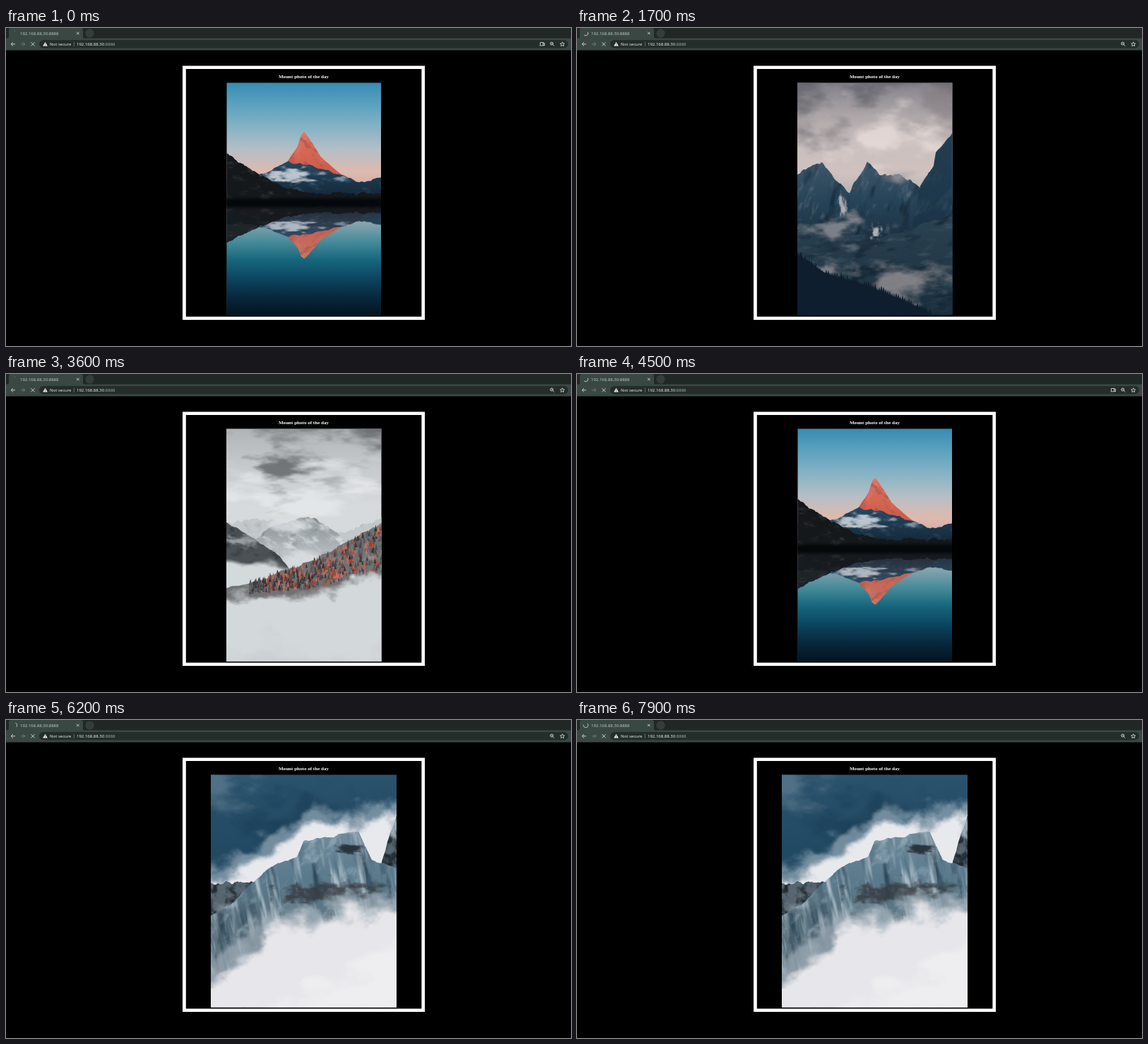
These frames come from a looping animation (800 by 450 pixels, 8000 ms). An HTML page with a canvas:

```html
<!DOCTYPE html>
<html lang="en">
<head>
<meta charset="utf-8">
<title>Mount photo of the day</title>
<style>
html, body { margin: 0; width: 100%; height: 100%; overflow: hidden; background: #000; }
svg, canvas { position: absolute; left: 0; top: 0; }
text { font: 6px "Noto Sans", "Open Sans", sans-serif; fill: #e6ebe9; }
.line { fill: none; stroke: #d3dad7; stroke-width: .9; }
</style>
</head>
<body>
<svg width="800" height="450" viewBox="0 0 800 450">
  <rect width="800" height="16" fill="#202724"/>
  <path d="M2 15Q4 15 4 12V3Q4 0 7 0H106Q109 0 109 3V12Q109 15 111 15Z" fill="#3a4843"/>
  <rect y="14.5" width="800" height="17" fill="#3a4843"/>
  <rect x="47" y="17" width="749" height="11.5" rx="5.7" fill="#242d2a"/>
  <circle cx="118.5" cy="7.5" r="6.2" fill="#343d3a"/>
  <path id="spin" class="line"/>
  <text x="20" y="9.7" style="fill:#b9c3bf">192.168.88.30:8888</text>
  <path class="line" d="M100 5.7l3.5 3.5m0-3.5l-3.5 3.5"/>
  <path class="line" d="M13 22.8H7.2M10 20l-2.8 2.8l2.8 2.8"/>
  <path class="line" style="stroke:#74807b" d="M21 22.8h5.8M24 20l2.8 2.8l-2.8 2.8"/>
  <path class="line" d="M35.4 20.2l5.2 5.2m0-5.2l-5.2 5.2"/>
  <path d="M55.5 19.8L58.8 25.5H52.2Z" fill="#f2f5f4"/>
  <path d="M55.5 21.7v1.8m0 .6v.7" stroke="#242d2a" stroke-width=".7"/>
  <text x="62" y="25">Not secure</text>
  <path d="M96.3 19.5V26" stroke="#7c8783" stroke-width=".7"/>
  <text x="100" y="25">192.168.88.30<tspan fill="#9ba6a2">:8888</tspan></text>
  <g id="device" class="line"><path d="M756.5 24v-3.5h5M755.5 24.8h4.5"/><rect x="760.5" y="21.7" width="2" height="3"/></g>
  <g class="line"><circle cx="772.7" cy="22" r="2"/><path d="M774.2 23.5l2.1 2.1M771.7 22h2"/></g>
  <path id="star" class="line"/>
  <rect id="outer" x="250" y="53.5" width="343" fill="#fff"/>
  <rect id="inner" x="254.8" y="58" width="333.6" fill="#000"/>
  <text x="421.5" y="71.2" text-anchor="middle" style="font:bold 7.08px 'Liberation Serif',serif;fill:#fff">Mount photo of the day</text>
</svg>
<canvas id="stage" width="800" height="450"></canvas>
<script>
const $ = id => document.getElementById(id);
const stage = $('stage').getContext('2d');
const LEFT = 280, TOP = 77.5, BOTTOM = 406.5, W = 280, H = 340;
let g, seed = 4242;

const rnd = () => (seed = seed * 16807 % 2147483647) / 2147483647;
const lattice = Float32Array.from({ length: 65536 }, rnd);
const cell = (x, y) => lattice[(x & 255) + 256 * (y & 255)];

function noise(x, y) {
  const ix = Math.floor(x), iy = Math.floor(y);
  let u = x - ix, v = y - iy;
  u *= u * (3 - 2 * u);
  v *= v * (3 - 2 * v);
  const a = cell(ix, iy), b = cell(ix, iy + 1);
  const top = a + (cell(ix + 1, iy) - a) * u;
  return top + (b + (cell(ix + 1, iy + 1) - b) * u - top) * v;
}

// Four octaves of noise, centred on zero.
function fractal(x, y) {
  let sum = -.47;
  for (let a = .5; a > .05; a /= 2) {
    sum += a * noise(x, y);
    x = x * 2 + 17;
    y = y * 2 + 5;
  }
  return sum;
}

// Height over x through a few key points.
const line = (...p) => x => {
  let i = 0;
  while (i < p.length - 4 && x > p[i + 2]) i += 2;
  const k = Math.min(1, Math.max(0, (x - p[i]) / (p[i + 2] - p[i])));
  return p[i + 1] + (p[i + 3] - p[i + 1]) * k;
};

// Amounts for mist: under a line, above a line, around a centre, everywhere.
const below = (top, soft) => (x, y) => (y - top(x)) / soft;
const above = (top, soft) => below(top, -soft);
const near = (cx, cy, rx, ry) => (x, y) => 1 - Math.hypot((x - cx) / rx, (y - cy) / ry);
const even = amount => () => amount;

function fade(y0, y1, ...colors) {
  const grad = g.createLinearGradient(0, y0, 0, y1);
  colors.forEach((c, i) => grad.addColorStop(i / (colors.length - 1), c));
  return grad;
}

function band(y0, y1, ...colors) {
  g.fillStyle = fade(y0, y1, ...colors);
  g.fillRect(LEFT, y0, W, y1 - y0);
}

// Noisy veil of one colour; with a hill it becomes the grain of its rock.
function mist(rgb, strength, amount, { sx = 42, sy = 26, slant = 0, hill } = {}) {
  const tile = document.createElement('canvas');
  tile.width = W;
  tile.height = H;
  const t = tile.getContext('2d'), img = t.createImageData(W, H), shift = rnd() * 200;
  for (let i = 0; i < W * H; i++) {
    const x = LEFT + i % W, y = 76 + Math.floor(i / W);
    const v = amount(x, y) + 2.4 * fractal((x + y * slant) / sx + shift, y / sy + shift);
    const a = Math.min(1, Math.max(0, v));
    img.data.set(rgb, i * 4);
    img.data[i * 4 + 3] = 255 * strength * a * a * (3 - 2 * a);
  }
  t.putImageData(img, 0, 0);
  g.save();
  if (hill) g.clip(hill);
  g.drawImage(tile, LEFT, 76);
  g.restore();
}

// Everything under a roughened skyline.
function ridge(fill, top, rough) {
  const hill = new Path2D(), shift = rnd() * 200;
  hill.moveTo(LEFT, BOTTOM);
  for (let x = LEFT; x <= LEFT + W; x++) hill.lineTo(x, top(x) + rough * fractal(x / 8, shift));
  hill.lineTo(LEFT + W, BOTTOM);
  g.fillStyle = fill;
  g.fill(hill);
  return hill;
}

function tree(x, y, h, color) {
  g.fillStyle = color;
  g.beginPath();
  g.moveTo(x, y - h);
  g.lineTo(x + h * .24, y);
  g.lineTo(x - h * .24, y);
  g.fill();
}

// Each photo is painted once on its own layer.
function photo(left, right, paint) {
  const layer = document.createElement('canvas');
  layer.width = 800;
  layer.height = 450;
  g = layer.getContext('2d');
  g.beginPath();
  g.rect(left, TOP, right - left, BOTTOM - TOP);
  g.clip();
  paint();
  return layer;
}

function alps() {
  seed = 77;
  let hill = ridge(fade(148, 205, '#db7362', '#cc5b49'),
    line(345, 235, 396, 193, 413, 167, 418, 151, 422, 148, 427, 154, 445, 181, 476, 207, 531, 240), 5);
  mist([125, 52, 50], .6, even(.1), { sx: 9, sy: 10, slant: -.7, hill });
  mist([240, 150, 122], .5, even(-.05), { sx: 6, sy: 14, slant: .4, hill });
  hill = ridge(fade(192, 245, '#23455e', '#122433'),
    line(345, 212, 376, 201, 398, 190, 425, 193, 446, 199, 476, 208, 500, 219, 531, 212), 7);
  mist([80, 108, 130], .5, even(0), { sx: 14, sy: 7, slant: -.8, hill });
  mist([196, 203, 212], .95, near(402, 208, 48, 12), { sx: 14, sy: 5, hill });
  mist([150, 170, 185], .8, near(477, 213, 24, 7), { sx: 14, sy: 5, hill });
  hill = ridge('#14181b', line(312, 177, 330, 189, 350, 203, 400, 228, 440, 234, 531, 234), 9);
  mist([66, 66, 68], .7, even(-.05), { sx: 13, sy: 6, slant: -.5, hill });
}

const sunrise = photo(312.5, 531, () => {
  band(77, 235, '#388bb2', '#5ba2c0', '#85b2c5', '#b3bfc6', '#dfb9ae', '#c9aaa5');
  alps();
  band(250, 407, '#b9a09d', '#86a4ad', '#478b9a', '#16667c', '#0b4560', '#07283d', '#04131e');
  g.save();
  g.globalAlpha = .9;
  g.transform(1, 0, 0, -.745, 0, 436);
  g.beginPath();
  g.rect(LEFT, 140, W, 110);
  g.clip();
  alps();
  g.restore();
  band(238, 257, '#05080a00', '#05080a', '#05080a', '#05080a00');
});

const misty = photo(312, 531.5, () => {
  band(77, 250, '#84828a', '#aaa3a6', '#c9bfbd', '#cfc2bf', '#aca5a8');
  mist([96, 96, 104], .8, above(line(312, 135, 400, 108, 531, 92), 60));
  mist([110, 108, 115], .6, near(320, 150, 50, 60));
  mist([233, 221, 217], .8, near(435, 152, 85, 50));
  mist([126, 117, 122], .5, near(520, 120, 40, 50));
  let hill = ridge(fade(187, 300, '#3f586a', '#274459', '#1b3142'),
    line(312, 207, 346, 189, 366, 214, 386, 231, 402, 206, 411, 187, 428, 207, 460, 208, 485, 225), 12);
  mist([122, 132, 140], .55, even(-.1), { sx: 7, sy: 16, slant: .35, hill });
  mist([18, 38, 54], .75, even(.1), { sx: 9, sy: 24, slant: .2, hill });
  mist([167, 159, 162], .7, near(452, 210, 34, 14));
  mist([190, 187, 189], .9, near(376, 252, 6, 24), { sx: 5, sy: 12 });
  hill = ridge(fade(149, 330, '#243d50', '#1d384c', '#182d3d'),
    line(470, 300, 486, 224, 505, 193, 508, 176, 531, 149), 10);
  mist([62, 86, 103], .5, even(0), { sx: 10, sy: 20, slant: .5, hill });
  hill = ridge(fade(275, 406, '#2a4151', '#1a2e3d'), line(312, 288, 430, 297, 531, 262), 10);
  mist([80, 98, 110], .5, even(-.05), { sx: 22, sy: 7, slant: 1, hill });
  mist([13, 28, 41], .6, even(.1), { sx: 20, sy: 9, slant: .8, hill });
  mist([190, 188, 190], .9, near(424, 288, 9, 13), { sx: 6, sy: 6 });
  mist([148, 146, 152], .8, near(374, 284, 58, 22), { sx: 30, sy: 15 });
  mist([143, 141, 147], .8, near(352, 340, 38, 17), { sx: 26, sy: 15 });
  mist([146, 141, 145], .85, near(460, 358, 90, 33), { sx: 32, sy: 18 });
  const slope = line(312, 320, 350, 347, 410, 364, 470, 389, 502, 406);
  ridge('#0f1e2e', slope, 5);
  for (let x = 314; x < 502; x += 3) tree(x, slope(x) + 4, 6 + rnd() * 6, '#101e2c');
});

const foggy = photo(312, 531.5, () => {
  band(77, 407, '#b0b4b6', '#c6cacc', '#d6dadc', '#d4d9dc', '#d3d7da', '#d0d4d7', '#c5cacd');
  mist([97, 101, 104], .85, above(line(312, 90, 400, 103, 531, 118), 50), { sx: 50, sy: 20 });
  mist([92, 96, 99], .8, near(400, 136, 62, 22), { sx: 36, sy: 14 });
  mist([116, 120, 123], .7, near(392, 178, 34, 16), { sx: 28, sy: 10 });
  mist([128, 132, 135], .6, near(465, 155, 48, 14), { sx: 28, sy: 10 });
  mist([230, 233, 235], .8, near(425, 165, 150, 50), { sx: 50, sy: 16 });
  let hill = ridge('#c3c8cb', line(312, 212, 350, 205, 420, 216, 480, 221, 531, 204), 14);
  mist([160, 167, 171], .6, even(0), { sx: 9, sy: 9, hill });
  hill = ridge(fade(200, 252, '#858d92', '#b4babe'), line(345, 238, 375, 217, 421, 203, 436, 203, 472, 227, 500, 255), 9);
  mist([224, 228, 231], .85, even(.15), { sx: 11, sy: 9, slant: -.7, hill });
  mist([90, 99, 105], .6, even(-.05), { sx: 9, sy: 8, slant: .6, hill });
  mist([220, 224, 227], .8, near(398, 216, 32, 14));
  mist([214, 219, 222], .95, below(line(345, 245, 531, 240), 22));
  hill = ridge('#4b5155', line(312, 210, 345, 229, 388, 259, 405, 280), 6);
  mist([170, 176, 180], .8, near(335, 233, 32, 14), { sx: 14, sy: 7, slant: -.6, hill });
  mist([38, 43, 46], .6, even(.1), { sx: 9, sy: 7, hill });
  mist([212, 217, 220], 1, below(line(312, 253, 390, 265, 531, 280), 12));
  const crest = line(312, 304, 355, 293, 400, 276, 440, 262, 470, 244, 531, 213);
  hill = ridge('#6f7172', crest, 8);
  for (let i = 0; i < 620; i++) {
    const x = 345 + rnd() * 188, depth = rnd() * (12 + (x - 345) * .28);
    const red = rnd() < .33 && x > 362;
    const tone = 45 + rnd() * 55;
    tree(x, crest(x) + depth + 4, 5 + rnd() * 5,
      red ? `rgb(${tone + 105},${tone + 15},${tone})` : `rgb(${tone},${tone},${tone + 2})`);
  }
  mist([190, 195, 198], .6, even(-.15), { sx: 22, sy: 14, hill });
  mist([211, 216, 219], 1, below(line(312, 303, 400, 306, 440, 304, 480, 290, 531, 272), 17), { sx: 26, sy: 18 });
  mist([196, 201, 205], .5, below(line(312, 370, 531, 380), 50));
});

const icy = photo(290, 553, () => {
  band(77, 407, '#2b526c', '#214962', '#2b546d', '#33596f');
  mist([118, 144, 161], .5, near(300, 85, 75, 50));
  mist([22, 56, 80], .5, near(400, 140, 100, 50));
  mist([136, 158, 174], .8, below(line(290, 205, 345, 172, 400, 140, 435, 115, 490, 117, 553, 102), 24), { sx: 30, sy: 24 });
  mist([232, 233, 237], 1, below(line(290, 217, 345, 192, 400, 158, 435, 133, 490, 136, 553, 122), 22), { sx: 30, sy: 24 });
  let hill = ridge('#56656f', line(523, 230, 535, 190, 548, 152, 553, 138), 12);
  mist([25, 34, 42], .9, even(.25), { sx: 8, sy: 8, hill });
  mist([178, 193, 204], .8, near(552, 150, 16, 22), { sx: 12, sy: 12 });
  hill = ridge(fade(157, 290, '#6f8b9b', '#5a7a8c', '#5d7380'),
    line(290, 276, 317, 262, 343, 236, 375, 207, 412, 194, 421, 172, 470, 163, 499, 157, 518, 199, 553, 209), 6);
  mist([28, 52, 70], .8, even(.12), { sx: 12, sy: 55, slant: -.18, hill });
  mist([203, 217, 224], .8, even(.02), { sx: 9, sy: 60, slant: -.18, hill });
  mist([172, 192, 203], .6, even(-.05), { sx: 14, sy: 14, slant: .5, hill });
  mist([30, 38, 46], .85, near(492, 181, 26, 10), { sx: 12, sy: 6, slant: -.6, hill });
  mist([52, 55, 60], .8, near(460, 243, 90, 16), { sx: 12, sy: 8, hill });
  mist([212, 218, 224], .7, near(310, 265, 40, 22));
  mist([158, 172, 183], .75, below(line(290, 330, 350, 283, 400, 262, 470, 245, 553, 228), 32), { sx: 28, sy: 22 });
  mist([231, 230, 234], 1, below(line(290, 367, 330, 337, 370, 295, 430, 272, 490, 262, 553, 244), 26), { sx: 34, sy: 26 });
  mist([240, 239, 240], .8, below(line(290, 420, 553, 290), 50));
});

const scenes = [
  [0, sunrise], [900, null], [1200, misty], [2400, null], [2800, foggy],
  [3700, null], [4000, sunrise], [4900, null], [5200, misty], [6000, null],
  [6200, icy], [6700, misty], [7300, null], [7500, icy]
];
// The tab spinner restarts shortly before each photo leaves.
const loads = [0, ...scenes.filter((s, i) => i && scenes[i - 1][1]).map(s => s[0] - 100)];
let shown;

function spinner(age) {
  const phase = age % 1333 / 666;
  const sweep = .12 + 4.2 * (phase < 1 ? phase : 2 - phase);
  const start = -1.6 + age * .0012;
  const at = a => `${12.4 + 3.3 * Math.cos(a)} ${7.4 + 3.3 * Math.sin(a)}`;
  $('spin').setAttribute('d', `M${at(start)}A3.3 3.3 0 ${+(sweep > Math.PI)} 1 ${at(start + sweep)}`);
}

function drawStar() {
  const points = Array.from({ length: 10 }, (_, i) => {
    const r = i % 2 ? 1.5 : 3.2, a = i * Math.PI / 5;
    return `${787.7 + r * Math.sin(a)} ${23 - r * Math.cos(a)}`;
  });
  $('star').setAttribute('d', `M${points.join('L')}Z`);
}

function draw(now) {
  const t = now % 8000;
  const [since, picture] = scenes.findLast(s => s[0] <= t);
  if (picture !== shown) {
    shown = picture;
    stage.clearRect(0, 0, 800, 450);
    if (picture) stage.drawImage(picture, 0, 0);
    $('outer').setAttribute('height', picture ? 359.5 : 30);
    $('inner').setAttribute('height', picture ? 350.5 : 21.3);
  }
  const device = picture === sunrise || since === 1200 && t < 1700;
  $('device').style.display = device ? '' : 'none';
  spinner(t - loads.findLast(s => s <= t));
}

drawStar();
const began = performance.now();
function tick() {
  draw(performance.now() - began);
  requestAnimationFrame(tick);
}
tick();
</script>
</body>
</html>
```
